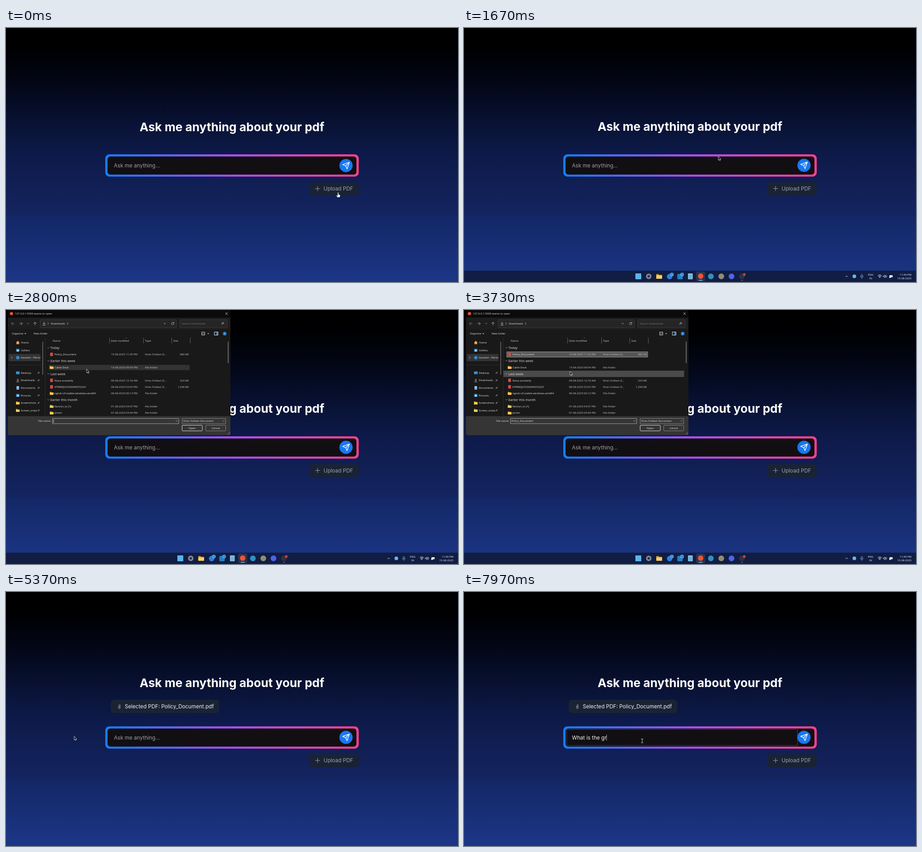
An HTML page with a canvas for the animation above (8 s loop, 997x561 px).

```html
<!DOCTYPE html>
<html lang="en">
<head>
<meta charset="utf-8">
<title>PDF chat</title>
<style>
html, body { margin: 0; width: 100%; height: 100%; overflow: hidden; background: #000; }
canvas { display: block; width: 997px; height: 561px; }
</style>
</head>
<body>
<canvas id="stage" width="997" height="561"></canvas>
<script>
const LOOP = 8000, W = 997, H = 561, UNIT = 558 / 768;
const INTER = 'Inter, sans-serif', UI = '"Open Sans", "Noto Sans", sans-serif';
const BODY = `${16 * UNIT}px ${INTER}`;
const stage = document.getElementById('stage').getContext('2d');
const sheet = Object.assign(document.createElement('canvas'), { width: W, height: H }).getContext('2d');
let g = stage;

// Moments of the story, in ms
const BAR_IN = 1400, OPEN = 1720, PICK = 3250, CONFIRM = 4500, CLOSE = 4590, LOADED = 5080, FOCUS = 5590;
const PROMPT = 'What is the gr';
const KEYS = [6100, 6380, 6570, 6620, 6690, 6860, 6960, 7060, 7160, 7260, 7360, 7460, 7640, 7800];
const PATH = [
  [0, 732, 363], [900, 732, 363], [1670, 561, 284], [2450, 178, 131], [2800, 178, 131],
  [3150, 162, 95], [3400, 162, 95], [3730, 234, 136], [4250, 410, 261], [4850, 410, 261],
  [5300, 137, 318], [5600, 231, 325], [5770, 231, 325], [6300, 393, 325]
];

const clamp = v => Math.min(1, Math.max(0, v));
const ease = v => v * v * (3 - 2 * v);
const ramp = (t, start, length) => clamp((t - start) / length);

function pointer(t) {
  const i = PATH.findIndex(p => p[0] > t);
  if (i < 0) return PATH[PATH.length - 1].slice(1);
  const [a, ax, ay] = PATH[i - 1], [b, bx, by] = PATH[i];
  const k = ease((t - a) / (b - a));
  return [ax + (bx - ax) * k, ay + (by - ay) * k];
}

function box(x, y, w, h, r, fill, line) {
  g.beginPath();
  g.roundRect(x, y, w, h, r);
  if (fill) { g.fillStyle = fill; g.fill(); }
  if (line) { g.strokeStyle = line; g.lineWidth = 1; g.stroke(); }
}

function dot(x, y, r, fill) {
  g.beginPath();
  g.arc(x, y, r, 0, 7);
  g.fillStyle = fill;
  g.fill();
}

function text(s, x, y, font, color, align = 'left') {
  g.font = font;
  g.fillStyle = color;
  g.textAlign = align;
  g.textBaseline = 'alphabetic';
  g.fillText(s, x, y);
}

const label = (s, x, y, color = '#e6e6e6', size = 6, align = 'left') =>
  text(s, x, y + size * 0.36, `${size}px ${UI}`, color, align);

function trace(d, x, y, scale, color, width, fill) {
  g.save();
  g.translate(x, y);
  g.scale(scale, scale);
  const path = new Path2D(d);
  if (fill) { g.fillStyle = fill; g.fill(path); }
  if (color) {
    g.strokeStyle = color;
    g.lineWidth = width / scale;
    g.lineJoin = g.lineCap = 'round';
    g.stroke(path);
  }
  g.restore();
}

const ICON = {
  down: 'M-2 -1L0 1L2 -1', right: 'M-1 -2L1 0L-1 2', up: 'M-2 1L0 -1L2 1',
  back: 'M3 0H-3M0 -3L-3 0L0 3', ahead: 'M-3 0H3M0 -3L3 0L0 3', rise: 'M0 3V-3M-3 0L0 -3L3 0',
  close: 'M-2.3 -2.3L2.3 2.3M2.3 -2.3L-2.3 2.3', save: 'M0 -3V2M-2.5 -.5L0 2L2.5 -.5M-3 4H3',
  reload: 'M2.4 -1.2A2.7 2.7 0 1 0 2.7 .6M2.6 -3V-1H.8', pin: 'M-2.2 2.2L-.5 .5M-1.5 -.6L.6 1.5M-.8 -.3L.8 -2L2 -.8L.3 .8',
  search: 'M-2.5 2.5L-.4 .4M2.7 -1A1.8 1.8 0 1 0 -.9 -1A1.8 1.8 0 1 0 2.7 -1',
  plane: 'M10 -10L3 10L-1 1L-10 -3ZM10 -10L-1 1',
  clip: 'M-2 -1V3A2 2 0 0 0 2 3V-3.4A1.4 1.4 0 0 0 -.8 -3.4V2.3A.6 .6 0 0 0 .6 2.3V-2'
};
const icon = (name, x, y, color = '#d0d0d0', width = 0.8, scale = 1) => trace(ICON[name], x, y, scale, color, width);

function folder(x, y, s = 1) {
  trace('M-4 -3.2H-1L0 -2H4V3.3H-4Z', x, y, s, null, 0, '#d99a2b');
  box(x - 4 * s, y - 1.2 * s, 8 * s, 4.5 * s, 0.8, '#f8cf64');
}

function picture(x, y) {
  box(x - 3.5, y - 3, 7, 6, 1, '#3b9ee8');
  trace('M-3 2.5L0 -1L3 2.5Z', x, y, 1, null, 0, '#d6effc');
}

function background() {
  const fill = g.createLinearGradient(0, 0, 0, H);
  [[0, '#000'], [.08, '#000002'], [.2, '#020513'], [.27, '#040a20'], [.4, '#0a1439'], [.5, '#0d1a49'],
    [.735, '#142460'], [.745, '#142867'], [1, '#1c3687']].forEach(s => fill.addColorStop(...s));
  g.fillStyle = fill;
  g.fillRect(0, 0, W, H);
}

function page(t) {
  const loaded = t >= LOADED, focused = t >= FOCUS;
  const nudge = t < 850 ? 0.5 : 0, y = loaded ? 17.7 : 0;
  text('Ask me anything about your pdf', 498.5, 227 + nudge - (loaded ? 17.2 : 0), `700 ${36 * UNIT}px ${INTER}`, '#fff', 'center');
  if (loaded) {
    box(231, 238, 239.5, 29.5, 8, '#192334');
    icon('clip', 250, 253, '#8c949d', 0.9);
    text('Selected PDF: Policy_Document.pdf', 262, 257.2, BODY, '#f2f3f5');
  }

  const rim = g.createLinearGradient(219, 0, 778, 0);
  [[0, '#147df8'], [.5, '#a950ef'], [1, '#fb418e']].forEach(s => rim.addColorStop(...s));
  box(219, 279 + y, 559, 49.2, 9, rim);
  box(224, 283.8 + y, 549, 40, 6, '#110f12');
  if (focused) box(226.5, 303.5, 509, 35.5, 0, null, '#34437f');
  const typed = PROMPT.slice(0, KEYS.filter(k => k <= t).length);
  text(typed || 'Ask me anything...', 238, 308 + y, BODY, typed ? '#f2f2f4' : '#a09fa6');
  if (focused) {
    g.font = BODY;
    g.fillStyle = '#b5b5ba';
    g.fillRect(Math.round(238 + g.measureText(typed).width), 315, 1, 13);
  }
  const cy = 303.3 + y + nudge;
  dot(750, cy, 14.6, '#1877f2');
  icon('plane', 750, cy, '#fff', 1.4, 0.74);

  box(668.5, 340.5 + y + nudge, 109.5, 28.5, 6, '#1a2335');
  trace('M-5 0H5M0 -5V5', 687.3, 354.4 + y + nudge, 1, '#9da2ab', 1);
  text('Upload PDF', 700.5, 358.5 + y + nudge, BODY, '#9da2ab');
}

function badge(x, s) {
  dot(x, 544.5, 4, '#4aa8ea');
  label(s, x, 544.5, '#10213c', 5.5, 'center');
}

function taskbar(t) {
  const shown = ease(ramp(t, BAR_IN, 150)) * (1 - ease(ramp(t, CONFIRM + 40, 160)));
  if (t > 4640 && t < 4850) {
    g.fillStyle = '#a3abc4';
    g.fillRect(0, 560, W, 1);
  }
  if (!shown) return;
  g.save();
  g.translate(0, (1 - shown) * 26);
  g.fillStyle = '#111d43';
  g.fillRect(0, 536, W, 25);
  box(378, 542, 13, 13, 1, '#56b5ef');
  dot(407.5, 548.5, 6, '#848b98');
  dot(407.5, 548.5, 2.8, '#25334e');
  folder(430.5, 548.5, 1.6);
  dot(453.5, 549, 6, '#2e7fd9');
  badge(458.5, '2');
  box(470.5, 543, 12, 12, 2, '#277dc1');
  badge(481, '6');
  box(494, 542, 10.5, 13, 1, '#85bee1');
  [546, 549, 552].forEach(y => { g.fillStyle = '#4a7faa'; g.fillRect(496, y, 6.5, 0.8); });
  box(512, 538, 20, 21, 3, '#29334f');
  dot(522, 548, 6, '#ee5334');
  box(517.5, 556.6, 9, 1.6, 1, '#65b9ef');
  dot(544.5, 548.5, 6.3, '#328fbe');
  dot(567.5, 548.5, 6.3, '#8e8d76');
  dot(590, 548.5, 6.3, '#5462e2');
  dot(613, 548.5, 6.3, '#30323d');
  dot(618.2, 544.5, 3, '#d2384b');
  box(612, 556.7, 3, 1.3, 1, '#9ca5b6');

  icon('up', 844, 548.5, '#dde2ee', 1, 1.1);
  dot(861, 548.5, 4, '#69b8e6');
  box(876, 544.5, 3, 5, 1.5, null, '#77aee4');
  trace('M-3 -1A3 3 0 0 0 3 -1M0 2V4', 877.5, 549.5, 1, '#77aee4', 0.8);
  label('ENG', 897, 545, '#eef1f8', 6, 'center');
  label('IN', 897, 553, '#eef1f8', 6, 'center');
  trace('M-4 -1.6Q0 -5 4 -1.6M-2.5 .2Q0 -2 2.5 .2M-1 2L0 3L1 2Z', 917, 548.5, 1, '#eef1f8', 1);
  trace('M-3.5 -1H-2L0 -3V3L-2 1H-3.5ZM1.5 -1.5Q2.5 0 1.5 1.5M3 -2.8Q5 0 3 2.8', 928.5, 548.5, 1, '#eef1f8', 0.8);
  box(938.5, 546, 7, 4.5, 1, '#eef1f8');
  box(938, 548, 3.5, 4, 1, '#eef1f8');
  label('11:49 PM', 987, 544.7, '#eef1f8', 6, 'right');
  label('15-08-2025', 987, 552.8, '#eef1f8', 6, 'right');
  g.restore();
}

const DOC = 'Vireo Folitext D...', DIR = 'File folder';
const ROWS = [
  ['Today'], ['Policy_Document', '15-08-2025 11:35 PM', DOC, '689 KB'],
  ['Earlier this week'], ['Cable Dock', '13-08-2025 09:54 PM', DIR],
  ['Last week'], ['Nova scooterly', '09-08-2025 12:18 AM', DOC, '324 KB'],
  ['KTRMQLP23024V072223', '08-08-2025 03:55 PM', DOC, '1,298 KB'],
  ['ngrok-v3-stable-windows-amd64', '06-08-2025 06:13 PM', DIR],
  ['Earlier this month'], ['favicon_io (1)', '01-08-2025 04:47 PM', DIR], ['prism', '01-08-2025 04:44 PM', DIR]
];

function fileRows(t) {
  const [px, py] = pointer(t);
  g.save();
  g.beginPath();
  g.rect(86, 60, 404, 174.5);
  g.clip();
  ROWS.forEach(([name, date, type, size], i) => {
    const y = 83.6 + i * 14.35, group = !date;
    const hover = Math.abs(py + 2 - y) < 7.1 && px > 87 && px < (group ? 486 : 405);
    if (group) {
      if (hover) box(87, y - 7, 398.5, 14, 0, '#4b4b4b');
      icon('down', 93.5, y, '#bcbcbc', 0.7);
      label(name, 98, y, '#e2e2e2', 7.2);
      return;
    }
    const chosen = i === 1 && t >= PICK;
    if (chosen || hover) box(94.5, y - 5.5, 310.5, 11.5, 0, chosen ? '#555' : '#333', chosen ? '#a2a2a2' : null);
    if (type === DOC) box(97.5, y - 3.8, 6, 7.5, 0.5, '#d94a48');
    else folder(100.7, y);
    label(name, 107, y);
    label(date, 231.5, y, '#c9c9c9');
    label(type, 306.5, y, '#c9c9c9');
    if (size) label(size, 403, y, '#c9c9c9', 6, 'right');
  });
  g.restore();
}

function sidebar() {
  box(6, 97.3, 70, 15.7, 1, '#343434');
  trace('M-4 0L0 -4L4 0H3V3.5H-3V0Z', 26, 72, 1, null, 0, '#e8a35c');
  label('Home', 33, 72);
  picture(26, 88.7);
  label('Gallery', 33, 88.7);
  icon('right', 13, 105.2, '#d0d0d0', 0.8);
  dot(26, 105.2, 3.7, '#258ddb');
  g.save();
  g.beginPath();
  g.rect(32, 98, 44, 15);
  g.clip();
  label('Gautam - Personal', 32.5, 105.2);
  g.restore();
  ['Desktop', 'Downloads', 'Documents', 'Pictures', 'Screenshots', 'Screen_snips'].forEach((name, i) => {
    const y = 138.7 + i * 16.6;
    if (i === 0) box(22, y - 3, 8, 6, 1, '#2c95de');
    if (i === 1) icon('save', 26, y - 0.5);
    if (i === 2) { box(23, y - 4, 6, 8, 1, '#8aa9c5'); box(24, y - 2, 4, 1, 0, '#e8eff5'); }
    if (i === 3) picture(26, y);
    if (i > 3) folder(26, y);
    label(name, 32.5, y);
    icon('pin', 72, y, '#b8b8b8', 0.7);
  });
  g.fillStyle = '#2b2b2b';
  g.fillRect(5, 121, 75, 1);
  g.fillRect(86, 61, 1, 173);
  g.fillStyle = '#979797';
  g.fillRect(80.5, 70, 1, 73);
  g.fillRect(489.5, 70, 1.2, 47);
}

function dialog(t) {
  g.save();
  g.beginPath();
  g.roundRect(4, 0, 491, 276.5, [0, 0, 4, 4]);
  g.clip();
  box(4, 0, 491, 277, 0, '#191919');
  box(4, 0, 491, 17, 0, '#0b0b0b');
  box(4, 17, 491, 26, 0, '#1e1e1e');
  dot(12, 8, 3.6, '#e95437');
  label('127.0.0.1:5500 wants to open', 19.5, 8);
  icon('close', 486.5, 8, '#e5e5e5');

  icon('back', 15, 30, '#8e8e8e');
  icon('ahead', 33, 30, '#b8b8b8');
  icon('down', 49, 30, '#9a9a9a');
  icon('rise', 64, 30);
  box(75.5, 21.5, 300.5, 17.5, 1, '#252525', '#3b3b3b');
  icon('save', 84, 29.5);
  icon('right', 93, 30);
  label('Downloads', 99, 30);
  icon('right', 136, 30);
  icon('down', 350, 30);
  icon('reload', 367.5, 30);
  box(383.5, 21.5, 104.5, 17.5, 1, '#252525', '#3b3b3b');
  label('Search Downloads', 388, 30, '#777');
  icon('search', 477.5, 30);

  label('Organize', 13, 52);
  trace('M-2 -1H2L0 1.2Z', 42.5, 52.2, 1, null, 0, '#ccc');
  label('New folder', 61, 52);
  box(431.5, 48.5, 7, 7, 0, null, '#b9b9b9');
  [50.5, 53].forEach(y => { g.fillStyle = '#b9b9b9'; g.fillRect(432, y, 6, 0.8); });
  trace('M-2 -1H2L0 1.2Z', 446, 52.2, 1, null, 0, '#ccc');
  box(459.5, 48.5, 8, 7, 0, '#2a72b5', '#e0e0e0');
  box(460, 49, 3.5, 6, 0, '#202020');
  dot(482.3, 52.3, 4, '#2b7fd2');
  label('?', 482.3, 52.3, '#fff', 6, 'center');

  [['Name', 103], ['Date modified', 231.5], ['Type', 306.5], ['Size', 369]].forEach(([s, x]) => label(s, x, 67.5, '#d0d0d0'));
  g.fillStyle = '#606060';
  [228, 303, 365, 406].forEach(x => g.fillRect(x, 61, 1, 13));
  icon('up', 265.5, 61.5, '#999', 0.6, 0.7);
  sidebar();
  fileRows(t);

  box(4, 234.5, 491, 43, 0, '#353535');
  label('File name:', 99.5, 245, '#e0e0e0', 6, 'right');
  box(102.5, 239.5, 278.5, 11.5, 0, '#363636', '#a3a3a3');
  icon('down', 376.5, 245.2, '#c0c0c0', 0.7);
  if (t >= PICK) {
    if (t >= CONFIRM) box(104, 241, 48, 8.5, 0, '#2864b5');
    label('Policy_Document', 104.5, 245.3);
  } else {
    g.fillStyle = '#eee';
    g.fillRect(104.5, 241.5, 0.8, 7.5);
  }
  box(388.5, 239.5, 96, 11.5, 0, '#363636', '#858585');
  label('Vireo Folitext Document', 390.5, 245);
  icon('down', 480, 245.2, '#c0c0c0', 0.7);
  box(388.5, 254.5, 44.5, 12.5, 1.5, t >= CONFIRM ? '#34466a' : '#353535', '#dedede');
  label('Open', 410.5, 260.7, '#f2f2f2', 6, 'center');
  box(440.5, 254.5, 44, 12.5, 1.5, '#353535', '#858585');
  label('Cancel', 462.5, 260.7, '#e6e6e6', 6, 'center');
  trace('M489 275L494 270M492 275L494 273', 0, 0, 1, '#aaa', 0.7);
  g.restore();
}

function showDialog(t) {
  if (t <= OPEN || t >= CLOSE + 180) return;
  const entering = ease(ramp(t, OPEN, 160)), leaving = ramp(t, CLOSE, 180);
  const size = 1 - 0.07 * (1 - entering) - 0.065 * leaving;
  g = sheet;
  g.clearRect(0, 0, W, H);
  dialog(t);
  g = stage;
  g.save();
  g.globalAlpha = entering * (1 - leaving);
  g.translate(249, 138.3);
  g.scale(size, size);
  g.drawImage(sheet.canvas, -249, -138.3);
  g.restore();
}

function cursor(t) {
  const [x, y] = pointer(t);
  if (t < 900) {
    trace('M-1 0Q0 -1 1 0V4L4 5Q5 5.5 4.5 8L3.5 10.5H-1.5L-4 6.5Q-3.5 5 -1 7Z', x + 0.5, y + 0.5, 1, '#16191f', 0.5, '#fff');
  } else if (t < FOCUS - 30) {
    trace('M0 0V8L1.9 6.3L3.2 9.1L4.5 8.5L3.2 5.8H5.5Z', x, y, 1, '#e8e8ec', 0.8, '#07080c');
  } else {
    trace('M-2 -4.2H-.6L0 -3.7L.6 -4.2H2M0 -3.7V3.7M-2 4.2H-.6L0 3.7L.6 4.2H2', x, y + 3.8, 1, '#e2e2e5', 0.9);
  }
}

function draw(t) {
  background();
  page(t);
  taskbar(t);
  showDialog(t);
  cursor(t);
}

const start = performance.now();
function tick() {
  draw((performance.now() - start) % LOOP);
  requestAnimationFrame(tick);
}
tick();
</script>
</body>
</html>
```
